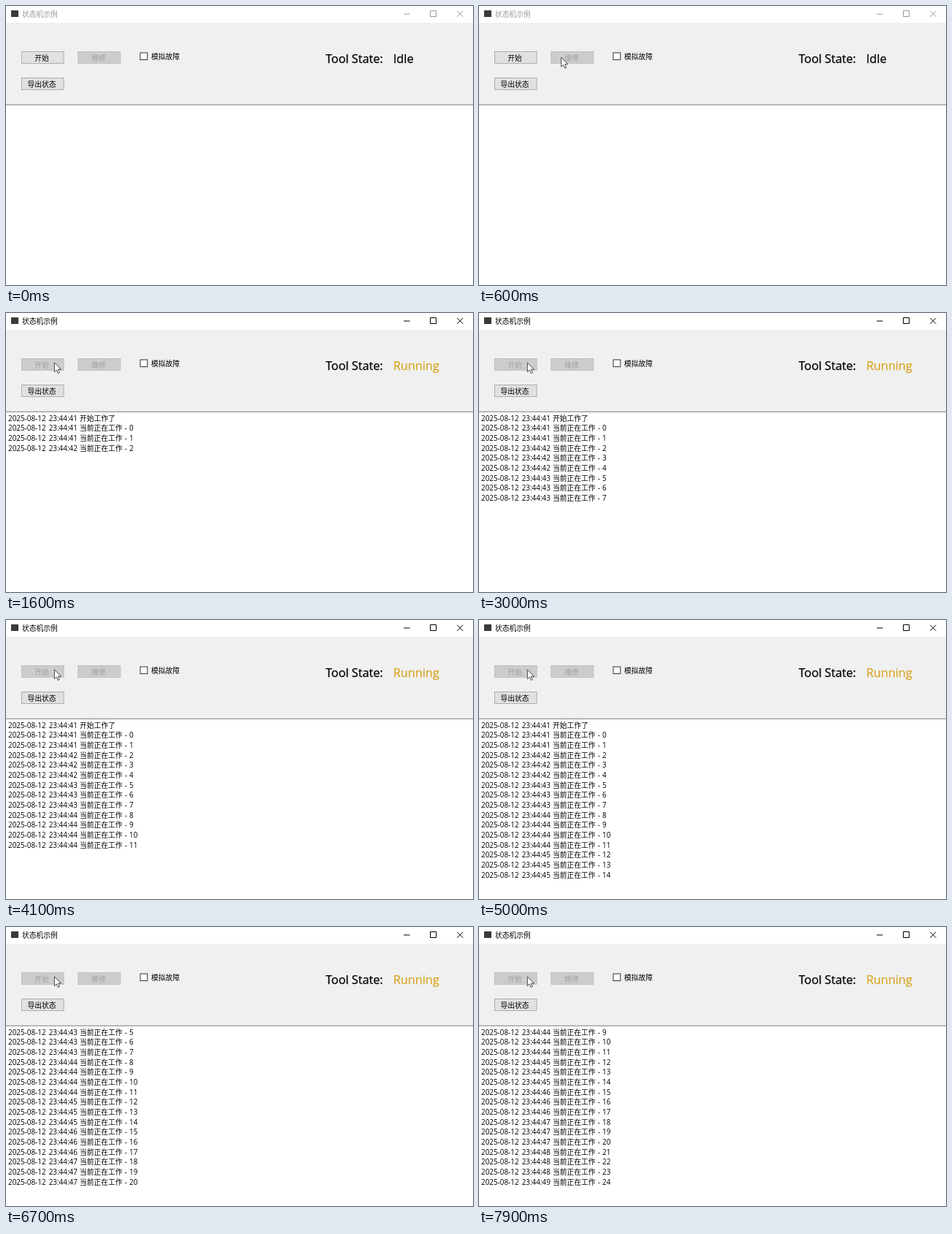
An HTML page for the animation above (8 s loop, 640 by 382 pixels).

```html
<!DOCTYPE html>
<html lang="zh-CN">
<head>
<meta charset="utf-8">
<style>
  html, body { margin: 0; width: 100%; height: 100%; overflow: hidden; background: #fff; }
  svg { display: block; width: 640px; height: 382px; }
  text { font: 9.75px "Noto Sans CJK SC", "Noto Sans CJK", sans-serif; }
  .num { font: 9.9px "Open Sans", "Noto Sans", sans-serif; }
  .big { font: 16.25px "Open Sans", "Noto Sans", sans-serif; stroke: currentColor; fill: currentColor; stroke-width: .25; }
  .title { fill: #000; }
  .ctrl { stroke: #000; fill: none; }
  .inactive .title { fill: #999; }
  .inactive .ctrl { stroke: #999; }
  .btn rect { fill: #e1e1e1; stroke: #adadad; }
  .btn.hover rect { fill: #e5f1fb; stroke: #0078d7; }
  .btn.press rect { fill: #cce4f7; stroke: #005499; }
  .btn.off rect { fill: #ccc; stroke: #bfbfbf; }
  .btn.off text { fill: #a0a0a0; }
</style>
</head>
<body>
<svg viewBox="0 0 640 382">
  <g id="bar">
    <rect x="7" y="6" width="10" height="9" fill="#3a3a3a"/>
    <text class="title" x="22" y="14.6">状态机示例</text>
    <path class="ctrl" d="M545 11h8.5M581.5 6.5h8v8h-8zM618.3 6.8l8 8M626.3 6.8l-8 8"/>
  </g>
  <rect y="23" width="640" height="112" fill="#f0f0f0"/>
  <rect y="134.7" width="640" height="1.2" fill="#929292"/>

  <g id="start" class="btn">
    <rect x="21.5" y="62.5" width="57.6" height="16"/>
    <text x="39.3" y="74.6">开始</text>
  </g>
  <g class="btn off">
    <rect x="98.8" y="62.5" width="58" height="16"/>
    <text x="117.3" y="74.6">维修</text>
  </g>
  <g class="btn">
    <rect x="21.5" y="98.5" width="57.6" height="16"/>
    <text x="29.5" y="110.7">导出状态</text>
  </g>
  <rect x="184" y="64" width="9.8" height="9.6" fill="#fff" stroke="#333"/>
  <text x="199" y="72.6">模拟故障</text>

  <text class="big" x="438" y="77.9">Tool State:</text>
  <text class="big" id="state" x="530.8" y="77.9">Idle</text>

  <g id="log"></g>
  <path id="cursor" d="M.4 .4V13.2L3.3 10.5L5.3 15L7.4 14.1L5.4 9.7H9.4Z"
        fill="#fff" stroke="#222" stroke-width=".8"/>
</svg>
<script>
  const LOOP = 8000, ROWS = 16, PITCH = 13.667;
  const $ = id => document.getElementById(id);
  const log = $('log');

  function addText(x, y, cls) {
    const el = document.createElementNS('http://www.w3.org/2000/svg', 'text');
    el.setAttribute('x', x);
    el.setAttribute('y', y);
    el.setAttribute('class', cls);
    return log.appendChild(el);
  }

  const rows = Array.from({ length: ROWS }, (_, i) => {
    const y = 147.6 + i * PITCH;
    return [addText(3, y, 'num'), addText(58.7, y, 'num'), addText(101, y, ''),
            addText(162.7, y, 'num'), addText(169, y, 'num')];
  });

  // Entry 0 announces the start; entry i reports counter i - 1.
  function entry(i) {
    const n = i - 1;
    const sec = 41 + Math.floor(0.575 + 0.31 * Math.max(0, n));
    const stamp = ['2025-08-12', '23:44:' + sec];
    return i ? [...stamp, '当前正在工作', '-', n] : [...stamp, '开始工作了', '', ''];
  }

  function drawLog(tick) {
    const count = tick < 10 ? 0 : Math.ceil((tick - 9.37) / 2.86) + 1;
    const first = Math.max(0, count - ROWS);
    rows.forEach((cells, r) => {
      const parts = first + r < count ? entry(first + r) : [];
      cells.forEach((cell, c) => { cell.textContent = parts[c] ?? ''; });
    });
  }

  function drawCursor(tick) {
    const left = (1 - Math.min(1, (tick - 1) / 7)) ** 2;
    const x = 66 + 568 * left;
    const y = (tick < 15 ? 66 : 67.5) + 50 * left;
    $('cursor').setAttribute('transform', `translate(${x} ${y})`);
    $('cursor').style.display = tick < 1 ? 'none' : '';
  }

  function draw(tick) {
    const running = tick >= 10;
    $('bar').setAttribute('class', tick < 9 ? 'inactive' : '');
    $('start').setAttribute('class', 'btn ' +
      (running ? 'off' : tick === 9 ? 'press' : tick >= 7 ? 'hover' : ''));
    $('state').textContent = running ? 'Running' : 'Idle';
    $('state').style.color = running ? '#daa520' : '#000';
    drawCursor(tick);
    drawLog(tick);
  }

  const begin = performance.now();
  let shown = -1;
  function frame() {
    const tick = Math.floor((performance.now() - begin) % LOOP / 100);
    if (tick !== shown) draw(shown = tick);
    requestAnimationFrame(frame);
  }
  frame();
</script>
</body>
</html>
```
